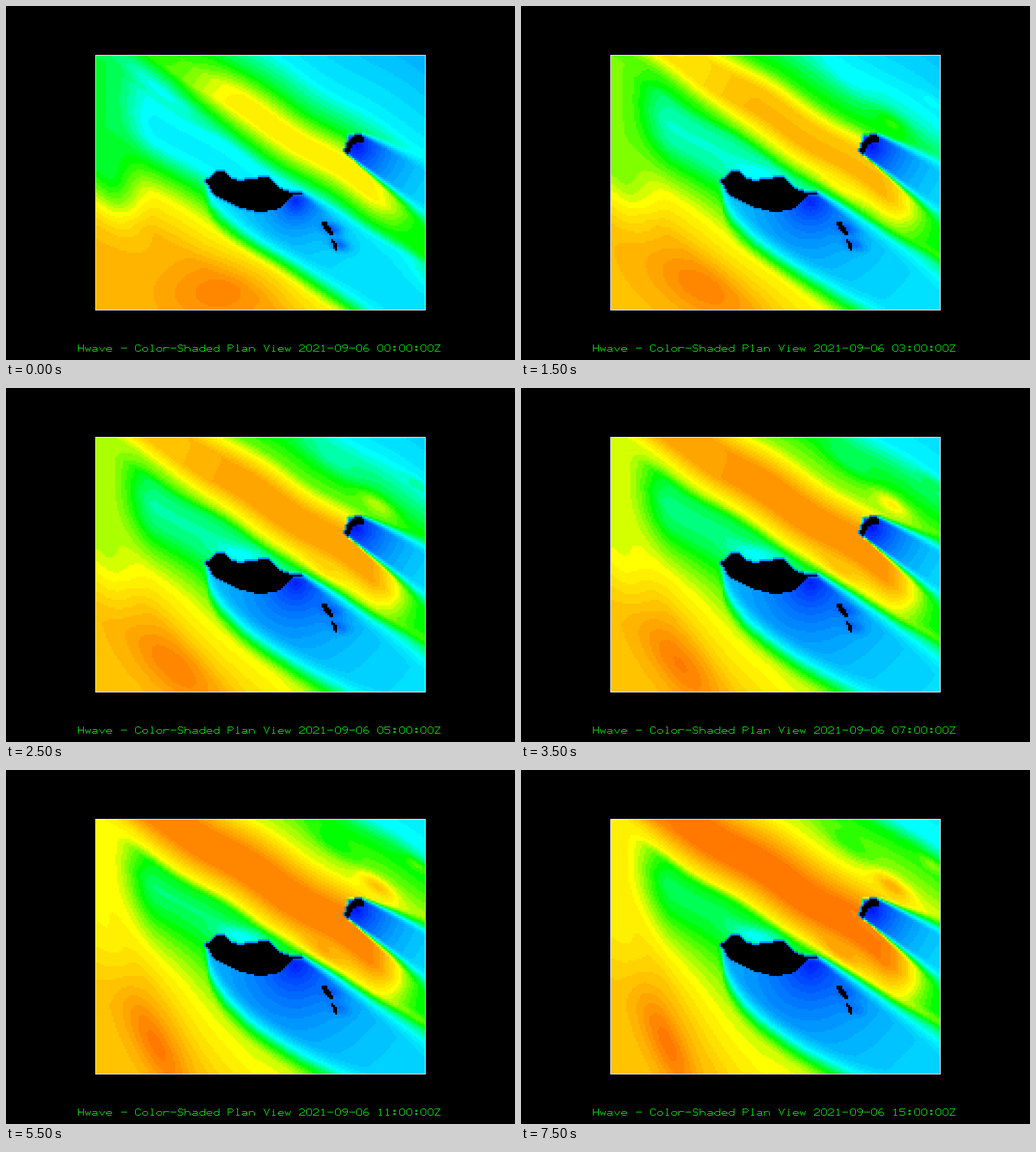
Write a matplotlib script that moves like this. It is 792 px wide and 550 px high and loops after 8 s.

```python
import numpy as np
import matplotlib.pyplot as plt
from matplotlib.animation import FuncAnimation
from matplotlib.path import Path

W, H, DPI = 792, 550, 100
LEFT, RIGHT, TOP, BOTTOM = 140, 652, 77, 472
COLS, ROWS, HOURS = 171, 132, 16

X, Y = np.meshgrid(LEFT + (np.arange(COLS) + 0.5) * (RIGHT - LEFT) / COLS,
                   TOP + (np.arange(ROWS) + 0.5) * (BOTTOM - TOP) / ROWS)
col = np.arange(RIGHT - LEFT) * COLS // (RIGHT - LEFT)
row = np.arange(BOTTOM - TOP) * ROWS // (BOTTOM - TOP)

ISLANDS = [
    [(311, 271), (326, 257), (339, 257), (350, 267), (366, 273), (376, 268),
     (410, 266), (426, 283), (441, 288), (459, 289), (459, 293), (444, 294),
     (426, 314), (395, 320), (362, 312), (323, 292)],
    [(538, 203), (548, 199), (557, 203), (557, 210), (541, 214), (531, 230),
     (526, 226), (530, 212)],
    [(491, 333), (498, 334), (508, 352), (506, 356), (492, 343)],
    [(505, 362), (511, 364), (516, 376), (511, 379)],
]
cells = np.column_stack([X.ravel(), Y.ravel()])
LAND = np.any([Path(p).contains_points(cells) for p in ISLANDS], axis=0)
LAND = LAND.reshape(ROWS, COLS)
COAST = np.any([np.roll(LAND, s, a) for s in (-1, 1) for a in (0, 1)], axis=0)

# Cut across the swell: position and level, each at the first and last hour.
# Levels: 0 blue, 17 cyan, 23 green, 29 yellow, 38 deep orange
SECTION = np.array([
    (-80, -80, 11.5, 16), (0, -32, 14, 17.5), (60, -10, 16, 22.5),
    (118, 82, 22, 29),                                  # north of the band
    (160, 140, 29.5, 37.5), (188, 195, 30.5, 37.5), (228, 236, 23, 29.5),
    (252, 252, 17, 23), (290, 283, 16, 20.5), (315, 320, 17, 22.5),
    (352, 365, 23, 26), (395, 410, 29, 29), (460, 490, 33.5, 32.5),
    (580, 580, 33.5, 33),                               # southwest
])
PACE = np.where(np.arange(len(SECTION)) < 4, 1.7, 1)


def mix(a, b, t):
    return a + (b - a) * t


def smooth(v, a, b):
    t = np.clip((v - a) / (b - a), 0, 1)
    return t * t * (3 - 2 * t)


def spot(cx, cy, along, across, angle=35):
    c, s = np.cos(np.radians(angle)), np.sin(np.radians(angle))
    u, v = (X - cx) * c + (Y - cy) * s, (Y - cy) * c - (X - cx) * s
    return np.exp(-(u / along) ** 2 - (v / across) ** 2)


def open_sea(e):
    """Swell bands without the islands, e runs from calm (0) to full (1)."""
    q = Y - 0.62 * (X - 400) + 3 * np.sin((X + 0.6 * Y) / 33)
    spread = np.clip(1 + (X - 270) * 0.006 * e * e, 0.4, 1.6)
    cut = np.where(q > 310, 310 + (q - 310) / spread, q)
    q0, q1, p0, p1 = SECTION.T
    p = np.interp(cut, mix(q0, q1, e ** PACE), mix(p0, p1, e ** PACE))

    band = smooth(q, 110, 160) * smooth(-q, -250, -225)
    p = mix(p, 22.5, band * smooth(X, 560, 655))
    p -= 6 * (1 - e) * band * smooth(-X, -370, -240)
    west = smooth(-X, -235, -155) * smooth(q, 190, 240) * smooth(-q, -520, -390)
    p = mix(p, mix(21.5, 30, e), west)

    p += mix(3.5, 5, e) * spot(mix(330, 228, e), mix(445, 425, e),
                               90, mix(55, 28, e), mix(0, 65, e))
    p += 6 * e * spot(577, 180, 34, 12) + 4 * e * spot(495, 285, 38, 12)
    p += 3 * e * spot(640, 148, 25, 8) - 2.5 * e * spot(512, 118, 50, 14)
    p -= 4 * e * spot(372, 258, 45, 14, 10)
    p += 6 * (1 - e) * spot(655, 440, 40, 50)
    return p


def main_lee(e):
    """Depth and cover of the shadow behind the long island."""
    reach = np.maximum(X - 312, 0)
    south = 285 + mix(9, 13.6, e) * np.sqrt(reach) + 0.0009 * (1 - e) * reach ** 2
    north = np.interp(X, [312, 462, 650], [275, 291, 416])
    w = 6 + 0.13 * np.maximum(X - 462, 0)
    cover = (smooth((south - Y) / 1.4, -24, 28)
             * smooth((Y - north) / 1.2, -w, w) * smooth(X, 304, 318))
    d = np.hypot(X - 450, Y - 303)
    level = 2 + 13.5 * (1 - np.exp(-d / mix(45, 105, e)))
    return level, cover


def small_lee():
    """Depth and cover of the shadow behind the curved island."""
    north = 200 + 0.45 * np.maximum(X - 556, 0)
    south = 231 + 0.8 * np.maximum(X - 532, 0)
    w = 3 + 0.12 * np.maximum(X - 540, 0)
    cover = (smooth((Y - north) / 1.1, -w, w) * smooth((south - Y) / 1.3, -w, w)
             * smooth(X, 527, 534))
    level = 1 + 15.5 * (1 - np.exp(-np.hypot(X - 545, Y - 218) / 70))
    return level, cover


def sea(hour):
    e = (1 - np.exp(-hour / 5)) / (1 - np.exp(-3))
    p = open_sea(e)
    for level, cover in (main_lee(e), small_lee()):
        p = mix(p, np.minimum(p, level), cover)
    for x, y in ((506, 346), (518, 370)):
        p -= mix(7, 2.5, e) * spot(x, y, 17, 9, 20)
    p = np.where(COAST, np.minimum(p, 10), p)
    v = np.round(np.clip(p, 0, 38))
    stops = [0, 17, 23, 29, 46]
    rgb = np.stack([np.interp(v, stops, c) for c in (
        [0, 0, 0, 255, 255], [0, 255, 255, 255, 0], [255, 255, 0, 0, 0])], -1)
    rgb[LAND] = 0
    return rgb


# Stroke font, 8 wide and 10 high, y up from the baseline
def ring(x0, y0, x1, y1, c=2):
    return [(x0 + c, y0), (x1 - c, y0), (x1, y0 + c), (x1, y1 - c),
            (x1 - c, y1), (x0 + c, y1), (x0, y1 - c), (x0, y0 + c), (x0 + c, y0)]


def bar(x, y0=0, y1=10):
    return [(x, y0), (x, y1)]


O, LOW, HIGH = ring(0, 0, 8, 6), ring(0, 0, 8, 5), ring(0, 5, 8, 10)
ARCH = [(0, 4), (2, 6), (6, 6), (8, 4), (8, 0)]
FOOT = [(2, 0), (6, 0)]
HOOK = [(8, 3), (6, 0), (2, 0), (0, 1)]
GLYPHS = {
    " ": [], "-": [[(0, 5), (8, 5)]],
    ":": [ring(3, 1, 5, 3, 0), ring(3, 6, 5, 8, 0)],
    "H": [bar(0), bar(8), [(0, 5), (8, 5)]],
    "C": [ring(0, 0, 8, 10)[3:] + ring(0, 0, 8, 10)[1:3]],
    "S": [[(8, 8), (6, 10), (2, 10), (0, 8), (2, 5), (6, 5)] + HOOK],
    "P": [bar(0), [(0, 10), (6, 10), (8, 8), (8, 7), (6, 5), (0, 5)]],
    "V": [[(0, 10), (4, 0), (8, 10)]],
    "Z": [[(0, 10), (8, 10), (0, 0), (8, 0)]],
    "w": [[(0, 6), (2, 0), (4, 5), (6, 0), (8, 6)]],
    "a": [[(1, 6), (6, 6), (7, 5), (7, 1), (8, 0)], ring(0, 0, 7, 3, 1)],
    "v": [[(0, 6), (4, 0), (8, 6)]],
    "e": [[(0, 3), (8, 3)] + O[3:] + [(7, 0)]],
    "o": [O], "d": [O, bar(8)],
    "l": [bar(4), FOOT, [(3, 10), (4, 10)]],
    "i": [bar(4, 0, 6), FOOT, [(3, 6), (4, 6)], bar(4, 8, 9)],
    "r": [bar(0, 0, 6), ARCH[:3] + [(8, 5)]],
    "h": [bar(0), ARCH], "n": [bar(0, 0, 6), ARCH],
    "0": [ring(0, 0, 8, 10)],
    "1": [bar(4), FOOT, [(2, 8), (4, 10)]],
    "2": [[(0, 8), (2, 10), (6, 10), (8, 8), (8, 6), (0, 1), (0, 0), (8, 0)]],
    "3": [[(0, 9), (2, 10), (6, 10), (8, 8), (6, 5), (3, 5)], [(6, 5)] + HOOK],
    "4": [bar(6), [(6, 10), (0, 3), (8, 3)]],
    "5": [[(8, 10), (0, 10), (0, 6), (6, 6)] + HOOK],
    "6": [LOW, [(0, 3), (0, 6), (3, 10), (6, 10)]],
    "7": [[(0, 10), (8, 10), (3, 0)]],
    "8": [LOW, HIGH],
    "9": [HIGH, [(8, 7), (8, 4), (5, 0), (2, 0)]],
}


def write(canvas, text, x=112, base=536, pitch=11.1):
    for i, ch in enumerate(text):
        left = x + round(i * pitch)
        for line in GLYPHS[ch]:
            for (ax0, ay0), (ax1, ay1) in zip(line, line[1:]):
                n = max(abs(ax1 - ax0), abs(ay1 - ay0)) + 1
                px = np.rint(np.linspace(ax0, ax1, n)).astype(int)
                py = np.rint(np.linspace(ay0, ay1, n)).astype(int)
                canvas[base - py, left + px] = (0, 255, 0)


def render(hour):
    canvas = np.zeros((H, W, 3), np.uint8)
    canvas[TOP - 1:BOTTOM + 1, LEFT - 1:RIGHT + 1] = 255
    canvas[TOP:BOTTOM, LEFT:RIGHT] = sea(hour)[row][:, col]
    write(canvas, f"Hwave - Color-Shaded Plan View 2021-09-06 {hour:02d}:00:00Z")
    return canvas


fig = plt.figure(figsize=(W / DPI, H / DPI), dpi=DPI, facecolor="black")
ax = fig.add_axes([0, 0, 1, 1])
ax.axis("off")
image = ax.imshow(render(0), extent=(0, W, H, 0), interpolation="nearest",
                  aspect="auto")


def draw(hour):
    image.set_data(render(hour))
    return (image,)


anim = FuncAnimation(fig, draw, frames=HOURS, interval=500, repeat=True,
                     repeat_delay=0, blit=False)
plt.show()
```
